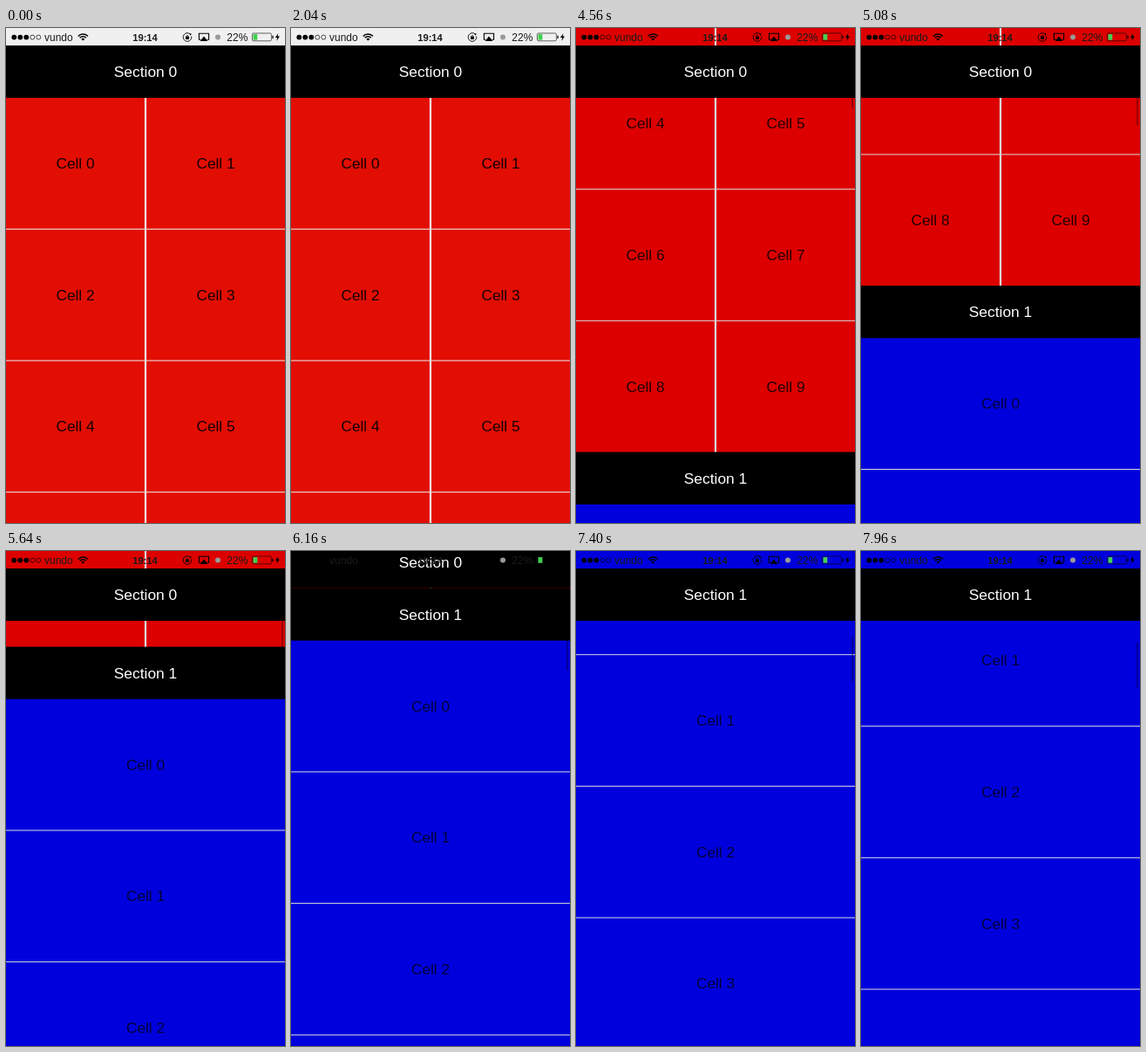
Write an HTML page with a canvas that moves like this. It is 320x567 px and loops after 8 s.

```html
<!DOCTYPE html>
<html lang="en">
<head>
<meta charset="utf-8">
<title>Sticky section headers</title>
<style>
  html, body { margin: 0; width: 100%; height: 100%; overflow: hidden; background: #f0f0f0; }
  canvas { display: block; width: 320px; height: 567px; }
</style>
</head>
<body>
<canvas id="stage"></canvas>
<script>
const W = 320, H = 567, LOOP = 8000, STEP = 40;
const CELL = 150, GAP = 2 / 3, PITCH = CELL + GAP;
const BAR = 20, HEADER = 60, SCROLL_START = 2520;
const FONT = '"Liberation Sans", Arial, sans-serif';

// Colours at rest and while the list is scrolling
const REST = { red: '#e20e03', paper: '#f0f0f0', ink: '#140000' };
const MOVING = { red: '#dd0000', paper: '#dcdcdc', ink: '#220000' };
const BLUE = '#0000dd', BLUE_INK = '#000038';

const canvas = document.getElementById('stage');
const ctx = canvas.getContext('2d');
const ratio = window.devicePixelRatio || 1;
canvas.width = Math.round(W * ratio);
canvas.height = Math.round(H * ratio);
ctx.scale(ratio, ratio);

// Content coordinates of the two sections
const FIRST_TOP = BAR + HEADER;
const SECOND_HEADER = FIRST_TOP + 5 * CELL + 4 * GAP;
const SECOND_TOP = SECOND_HEADER + HEADER;

// Scroll position over time, joined by a monotone cubic
const keys = [[SCROLL_START, 0], [3520, 145], [4560, 347], [5640, 723], [6840, 857], [7960, 993]];
const slopes = keys.slice(1).map(([t, s], i) => (s - keys[i][1]) / (t - keys[i][0]));
const tangents = keys.map((_, i) => {
  if (i === 0) return 0;
  if (i === keys.length - 1) return slopes[i - 1];
  return 2 * slopes[i - 1] * slopes[i] / (slopes[i - 1] + slopes[i]);
});

function scrollAt(t) {
  if (t <= keys[0][0]) return 0;
  const i = keys.findIndex((k, n) => n > 0 && t <= k[0]) - 1;
  if (i < 0) return keys[keys.length - 1][1];
  const [t0, s0] = keys[i], [t1, s1] = keys[i + 1];
  const d = t1 - t0, u = (t - t0) / d, v = 1 - u;
  return s0 * (1 + 2 * u) * v * v + tangents[i] * d * u * v * v
    + s1 * u * u * (3 - 2 * u) - tangents[i + 1] * d * u * u * v;
}

function rect(x, y, w, h, color) {
  ctx.fillStyle = color;
  ctx.fillRect(x, y, w, h);
}

function text(str, x, y, size, color, align = 'center', weight = 'normal') {
  ctx.font = `${weight} ${size}px ${FONT}`;
  ctx.textAlign = align;
  ctx.fillStyle = color;
  ctx.fillText(str, x, y);
}

// The block reaches slightly under both headers so that no seam shows
function section(top, columns, fill, ink, paper) {
  const rows = 5, height = rows * PITCH - GAP;
  rect(0, top - 1, W, height + 2, fill);
  for (let row = 1; row < rows; row++) {
    rect(0, top + row * PITCH - GAP / 2 - 0.5, W, 1, paper);
  }
  if (columns === 2) rect(158.9, top - 1, 2.2, height + 2, paper);
  for (let n = 0; n < rows * columns; n++) {
    const x = columns === 2 ? 79.5 + 161 * (n % 2) : W / 2;
    const y = top + Math.floor(n / columns) * PITCH + CELL / 2;
    text('Cell ' + n, x, y + 6, 17.3, ink);
  }
}

function header(n, y) {
  rect(0, y, W, HEADER, '#000');
  text('Section ' + n, W / 2, y + 36, 17.4, '#fff');
}

function poly(points) {
  ctx.beginPath();
  points.forEach(([x, y]) => ctx.lineTo(x, y));
  ctx.closePath();
  ctx.fill();
}

function disc(x, y, r) {
  ctx.beginPath();
  ctx.arc(x, y, r, 0, 2 * Math.PI);
}

function signal() {
  for (let i = 0; i < 5; i++) {
    const full = i < 3;
    disc(9.3 + i * 7, 10.6, full ? 2.9 : 2.5);
    if (full) ctx.fill(); else ctx.stroke();
  }
}

function wifi() {
  const x = 88.3, y = 14.6;
  ctx.lineWidth = 1.5;
  for (const r of [7.6, 4.9]) {
    ctx.beginPath();
    ctx.arc(x, y, r, -Math.PI * 0.76, -Math.PI * 0.24);
    ctx.stroke();
  }
  ctx.beginPath();
  ctx.moveTo(x, y);
  ctx.arc(x, y, 2.8, -Math.PI * 0.76, -Math.PI * 0.24);
  ctx.fill();
}

function rotationLock() {
  ctx.lineWidth = 0.9;
  ctx.beginPath();
  ctx.arc(208, 10.5, 4.8, -0.2, Math.PI * 1.75);
  ctx.stroke();
  poly([[210.4, 6], [213, 6.8], [211.2, 8.8]]);
  ctx.fillRect(206, 10, 4, 3);
  ctx.beginPath();
  ctx.arc(208, 10, 1.3, Math.PI, 0);
  ctx.stroke();
}

function screenCast() {
  ctx.lineWidth = 1.1;
  ctx.beginPath();
  ctx.moveTo(223.5, 13.2);
  ctx.lineTo(221.4, 13.2);
  ctx.lineTo(221.4, 6.2);
  ctx.lineTo(232.6, 6.2);
  ctx.lineTo(232.6, 13.2);
  ctx.lineTo(230.5, 13.2);
  ctx.stroke();
  poly([[227, 9.6], [231.4, 15], [222.6, 15]]);
}

function battery() {
  ctx.lineWidth = 0.6;
  ctx.beginPath();
  ctx.roundRect(282.4, 6, 22, 8.8, 1.6);
  ctx.stroke();
  ctx.fillRect(305.4, 8.7, 1.2, 3.4);
  rect(283.5, 7.1, 4.8, 6.6, '#42d052');
  ctx.fillStyle = '#000';
  poly([[312.4, 6], [308.8, 11], [311.2, 11], [310.2, 15], [314, 9.6], [311.6, 9.6]]);
}

function statusBar() {
  ctx.fillStyle = ctx.strokeStyle = '#000';
  ctx.lineWidth = 0.7;
  signal();
  wifi();
  rotationLock();
  screenCast();
  battery();
  disc(243, 10.5, 3);
  ctx.fillStyle = '#999';
  ctx.fill();
  text('vundo', 44, 14.6, 12, '#1a1a1a', 'left');
  text('19:14', W / 2 - 0.5, 14.5, 11.2, '#1a1a1a', 'center', 'bold');
  text('22%', 253.3, 14.6, 12, '#1a1a1a', 'left');
}

function indicator(t, scroll) {
  const alpha = Math.min(1, Math.max(0, (t - SCROLL_START) / 160));
  ctx.beginPath();
  ctx.roundRect(316, 5 + scroll * 0.1, 2, 53, 1);
  ctx.fillStyle = `rgba(0,0,0,${0.3 * alpha})`;
  ctx.fill();
}

function draw(t) {
  const scroll = scrollAt(t);
  const { red, paper, ink } = t <= SCROLL_START ? REST : MOVING;
  rect(0, 0, W, H, paper);

  section(FIRST_TOP - scroll, 2, red, ink, paper);
  section(SECOND_TOP - scroll, 1, BLUE, BLUE_INK, paper);

  // The second header pushes the first one out, then sticks
  const next = SECOND_HEADER - scroll;
  header(0, Math.min(BAR, next - HEADER));
  header(1, Math.max(BAR, next));

  indicator(t, scroll);
  statusBar();
}

const start = performance.now();
function tick() {
  const t = (performance.now() - start) % LOOP;
  draw(Math.floor(t / STEP) * STEP);
  requestAnimationFrame(tick);
}
tick();
</script>
</body>
</html>
```
